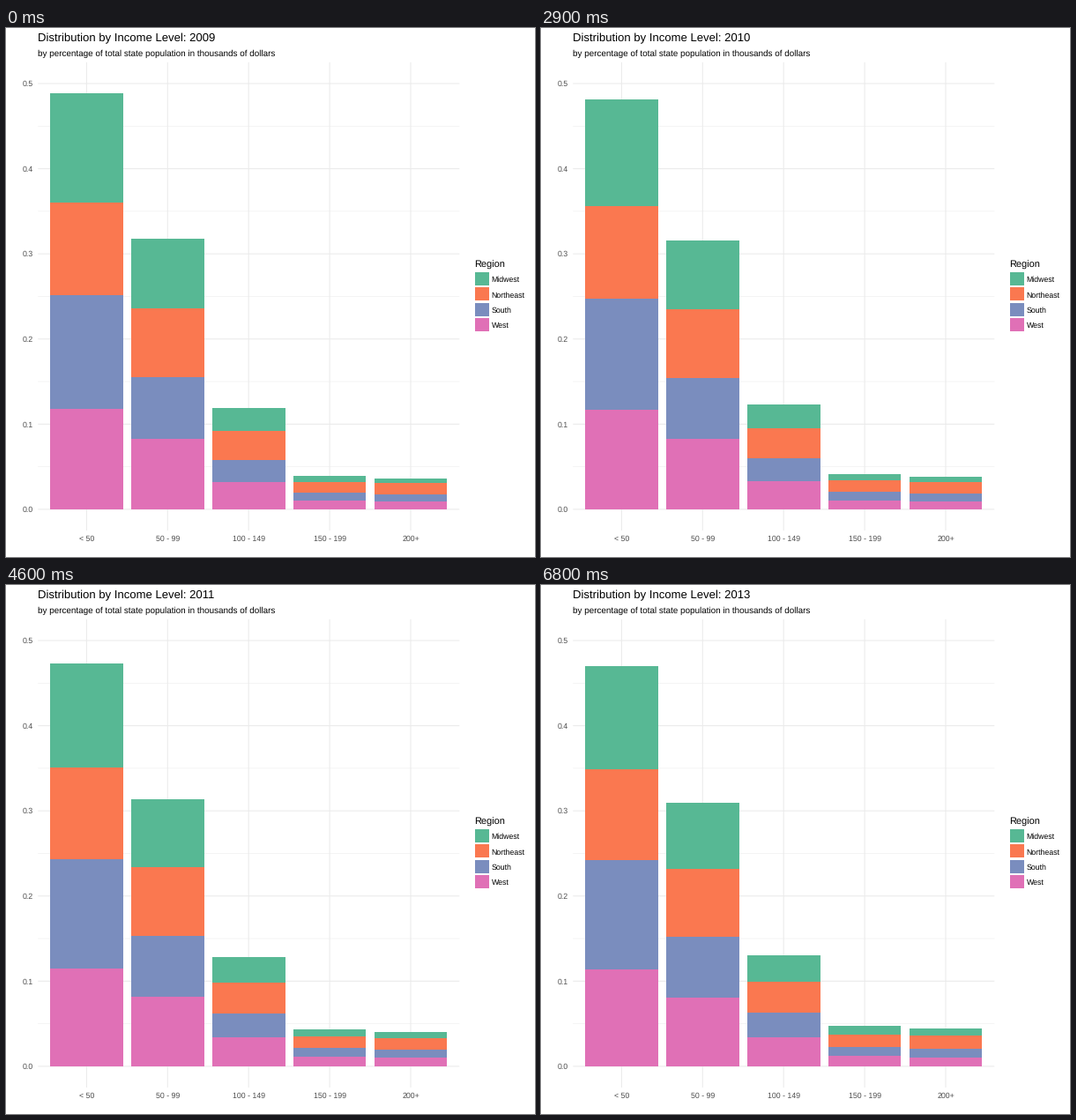
These frames come from a looping animation (600x600 px, 8000 ms). A matplotlib script:

```python
import numpy as np
import matplotlib.pyplot as plt
from matplotlib.animation import FuncAnimation
from matplotlib.patches import Rectangle

SIZE, DPI = 600, 100
PX = 72 / DPI  # points per pixel

plt.rcParams.update({
    "font.family": "Liberation Sans",
    "text.hinting": "none",
    "toolbar": "None",
})

REGIONS = {"Midwest": "#57b894", "Northeast": "#fa7850",
           "South": "#7a8dbe", "West": "#e070b6"}

BASE, TENTH = 545.9, 96.58        # y of 0.0 and height of 0.1
LEFT, RIGHT, TOP, BOTTOM = 36.3, 514.3, 38.9, 570
CENTER, STEP = 91.4, 91.9         # first bar centre and spacing
FLOOR, HALF = 546, 41.4           # foot and half width of the bars
GRID, TICK = "#ebebeb", "#4d4d4d"

# Segment tops in the first year, in pixels
LEVELS = {
    "< 50": (74, 197.6, 303.4, 432),
    "50 - 99": (239, 317.5, 395.6, 466),
    "100 - 149": (431, 457, 490, 515),
    "150 - 199": (508, 514.6, 527.4, 536),
    "200+": (511, 516.4, 529.4, 537.2),
}
START = np.array(list(LEVELS.values()))
FIRST_YEAR, SPAN = 2009, 4

# Drift of each bar over all years; lower segments follow in part
DRIFT = np.outer([18, 8, -11, -8, -8], [1, 0.62, 0.48, 0.2])
EARLY = np.array([True, False, True, False, False])[:, None]
EARLY_PACE = [0, 0.3, 0.8, 0.94, 1]

# Linear moves between years, in steps of 100 ms
MOVES = [(12, 17), (28, 34), (45, 51), (63, 68)]

fig = plt.figure(figsize=(SIZE / DPI, SIZE / DPI), dpi=DPI, facecolor="white")
ax = fig.add_axes([0, 0, 1, 1])
ax.set(xlim=(0, SIZE), ylim=(SIZE, 0))
ax.axis("off")


def label(x, y, text, size, color="black", ha="left"):
    return ax.text(x, y, text, fontsize=size * PX, color=color,
                   ha=ha, va="baseline")


def line(xs, ys, width):
    ax.plot(xs, ys, color=GRID, lw=width * PX, snap=False,
            solid_capstyle="butt", zorder=1)


def box(x0, y0, x1, y1, color):
    x0, y0, x1, y1 = map(round, (x0, y0, x1, y1))
    return ax.add_patch(Rectangle((x0, y0), x1 - x0, y1 - y0, facecolor=color,
                                  lw=0, antialiased=False, zorder=2))


# Grid and axis labels
for i in range(11):
    y = BASE - i * TENTH / 2
    line([LEFT, RIGHT], [y, y], 0.53 if i % 2 else 1.07)
    if i % 2 == 0:
        label(31.2, y + 3.2, f"{i / 20:.1f}", 8.8, TICK, "right")
for i, level in enumerate(LEVELS):
    x = CENTER + i * STEP
    line([x, x], [TOP, BOTTOM], 1.07)
    label(x, 582.2, level, 8.8, TICK, "center")

# Headings
title = label(35.6, 15, "", 13.1)
label(35.6, 32, "by percentage of total state population in thousands of dollars",
      9.9)

# Legend
label(531, 272, "Region", 11)
for i, (region, color) in enumerate(REGIONS.items()):
    top = 277.2 + 17.28 * i
    box(532, top, 548, top + 15, color)
    label(550.5, top + 11, region, 8.8)

bars = [[box(x - HALF, FLOOR, x + HALF, FLOOR, color)
         for color in REGIONS.values()]
        for x in CENTER + STEP * np.arange(len(LEVELS))]


def draw(frame):
    years = sum(np.clip((frame - a) / (b - a), 0, 1) for a, b in MOVES)
    pace = np.where(EARLY, np.interp(years, range(SPAN + 1), EARLY_PACE),
                    years / SPAN)
    for stack, tops in zip(bars, np.round(START + DRIFT * pace)):
        for rect, top, bottom in zip(stack, tops, [*tops[1:], FLOOR]):
            rect.set_y(top)
            rect.set_height(bottom - top)
    title.set_text(f"Distribution by Income Level: {round(FIRST_YEAR + years)}")
    return [title, *sum(bars, [])]


anim = FuncAnimation(fig, draw, frames=80, interval=100, repeat=True,
                     repeat_delay=0, blit=False)
plt.show()
```
